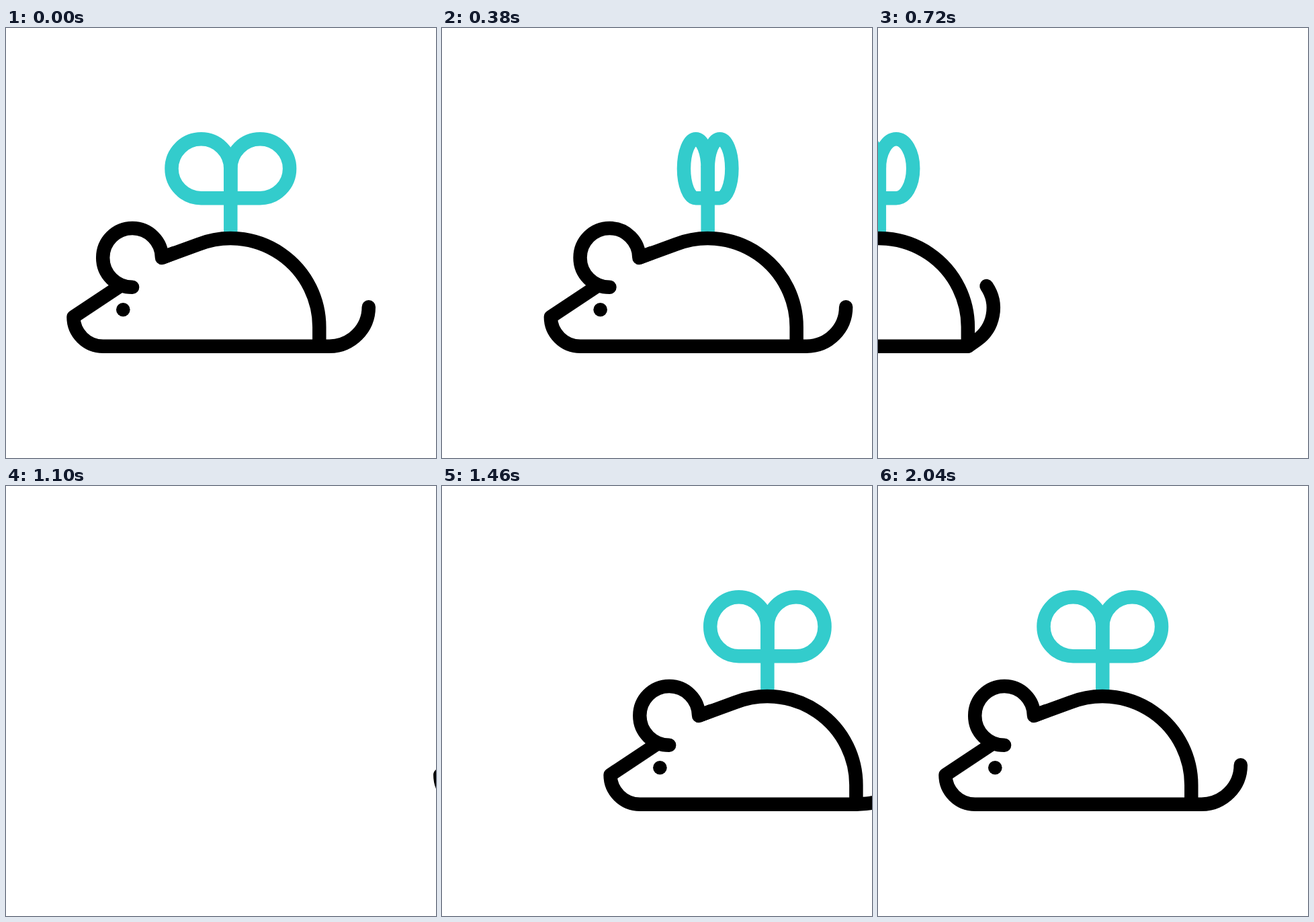
Write an HTML page that moves like this. It is 640 px wide and 640 px high and loops after 2400 ms.

```html
<!DOCTYPE html>
<html lang="en">
<head>
<meta charset="utf-8">
<title>Wind-up mouse</title>
<style>
  html, body { margin: 0; width: 100%; height: 100%; overflow: hidden; background: #fff; }
  svg { display: block; width: 100%; height: 100%; }
  path { fill: none; stroke: #000; stroke-width: 20.48; stroke-linejoin: round; }
  .key { stroke: #33cccc; }
  .round { stroke-linecap: round; }
</style>
</head>
<body>
<svg viewBox="0 0 640 640">
  <g id="mouse">
    <path class="key" d="M334.3 205V313"/>
    <path class="key" id="wings"/>
    <path id="tail" class="round" d="M466.3 473.7H481.4A58.4 58.4 0 0 0 539.8 415.3"/>
    <path d="M169 384.4L100.5 430A44 43.7 0 0 0 144.5 473.7H466.3V445A132 132 0 0 0 286.6 322L232 342"/>
    <path class="round" d="M188.1 385.8A43.9 43.9 0 1 1 232 342L250 335"/>
    <circle cx="174.3" cy="419.3" r="10.3"/>
  </g>
</svg>
<script>
const LOOP = 2400, STEP = 20, END = 2040;
const mouse = document.getElementById('mouse');
const wings = document.getElementById('wings');
const tail = document.getElementById('tail');

const smooth = s => s * s * (3 - 2 * s);

// [start, end, from, to] of each eased run of the body
const runs = [
  [0, 375, 0, 61.5],
  [375, 985, 61.5, -597.5],
  [1030, 1680, 564, 0]
];

function bodyX(t) {
  const [a, b, from, to] = runs.find(r => t < r[1]) || runs[2];
  const s = Math.min(1, Math.max(0, (t - a) / (b - a)));
  return from + (to - from) * smooth(s);
}

const SWAY_START = 460, SWAY = (END - SWAY_START) / 6;

function tailAngle(t) {
  if (t <= SWAY_START || t >= END) return 0;
  const p = (t - SWAY_START) / SWAY % 2;
  return -34.4 * smooth(p < 1 ? p : 2 - p);
}

// [time, degrees, degrees per ms]; the second turn mirrors the first
const spin = [
  [0, 0, 0], [260, 38, 0.18], [380, 66, 0.35],
  [580, 166, 0.5], [720, 235, 0.46], [1020, 360, 0.417]
];

function keyAngle(t) {
  if (t >= END) return 720;
  if (t > END / 2) return 720 - keyAngle(END - t);
  const i = Math.max(1, spin.findIndex(k => t <= k[0]));
  const [t0, a0, v0] = spin[i - 1], [t1, a1, v1] = spin[i];
  const d = t1 - t0, s = (t - t0) / d, q = 1 - s;
  return a0 + (a1 - a0) * smooth(s) + d * s * q * (v0 * q - v1 * s);
}

function wing(rx, side) {
  const r = Math.max(rx, 0.01), x = 334.3 + side * r, sweep = side > 0 ? 0 : 1;
  const arc = (px, py) => `A${r} 43.95 0 0 ${sweep} ${px} ${py}`;
  return `M334.3 253.2H${x}${arc(x + side * r, 209.25)}${arc(x, 165.3)}${arc(334.3, 209.25)}Z`;
}

function draw(now) {
  const t = Math.floor((now % LOOP) / STEP) * STEP;
  const rx = 43.9 * Math.abs(Math.cos(keyAngle(t) * Math.PI / 180));
  mouse.setAttribute('transform', `translate(${bodyX(t)} 0)`);
  tail.setAttribute('transform', `rotate(${tailAngle(t)} 466.3 473.7)`);
  wings.setAttribute('d', wing(rx, 1) + wing(rx, -1));
}

function tick() {
  draw(performance.now());
  requestAnimationFrame(tick);
}
draw(0);
requestAnimationFrame(tick);
</script>
</body>
</html>
```
